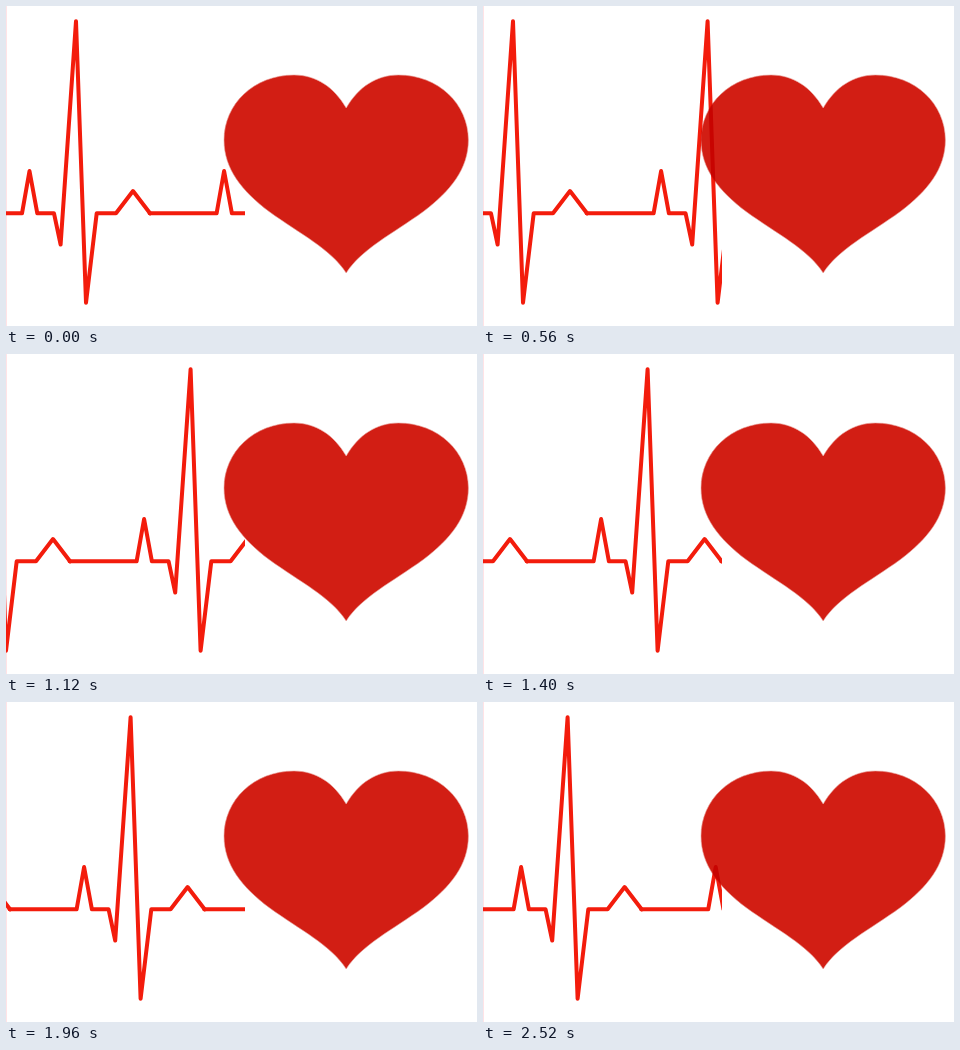
An HTML page for the animation above (2.59 s loop, 471 px wide and 320 px high).

```html
<!DOCTYPE html>
<html lang="en">
<head>
<meta charset="utf-8">
<title>Heartbeat</title>
<style>
  html, body { margin: 0; width: 100%; height: 100%; overflow: hidden; background: #fff; }
  svg { display: block; }
  .heart { fill: #d21e14; stroke: #e9a39d; stroke-width: .6; }
  .monitor { mix-blend-mode: multiply; }
  .trace {
    fill: none; stroke: #f31c0c; stroke-width: 4;
    stroke-linejoin: round; stroke-linecap: round;
    animation: scroll 2590ms steps(37, end) infinite;
  }
  @keyframes scroll { to { transform: translateX(-185px); } }
</style>
</head>
<body>
<svg width="471" height="320" viewBox="0 0 471 320">
  <defs>
    <clipPath id="screen"><path d="M0 0H238.5V320H0Z"/></clipPath>
    <path id="beat" d="M-51 207.3H16L23.5 165L31.3 207.3H48L54.6 238.5L70 15.2L80 296.8L90.7 207.3H110L127 185L144 207.3"/>
  </defs>
  <rect width="471" height="320" fill="#fff"/>
  <rect width="1" height="320" fill="#ffe3e6"/>
  <path class="heart" d="M340.2 102C328 81 310 69 288 69C248 69 218 98 218 134
    C218 163 236 185 263 205.500C294 228 325 243 340.200 267
    C355.400 243 386.400 228 417.400 205.500C444.400 185 462.400 163 462.400 134
    C462.400 98 432.400 69 392.400 69C370.400 69 352.400 81 340.200 102Z"/>
  <g class="monitor" clip-path="url(#screen)">
    <g class="trace">
      <use href="#beat"/>
      <use href="#beat" x="194.6"/>
      <use href="#beat" x="389.2"/>
    </g>
  </g>
</svg>
</body>
</html>
```
